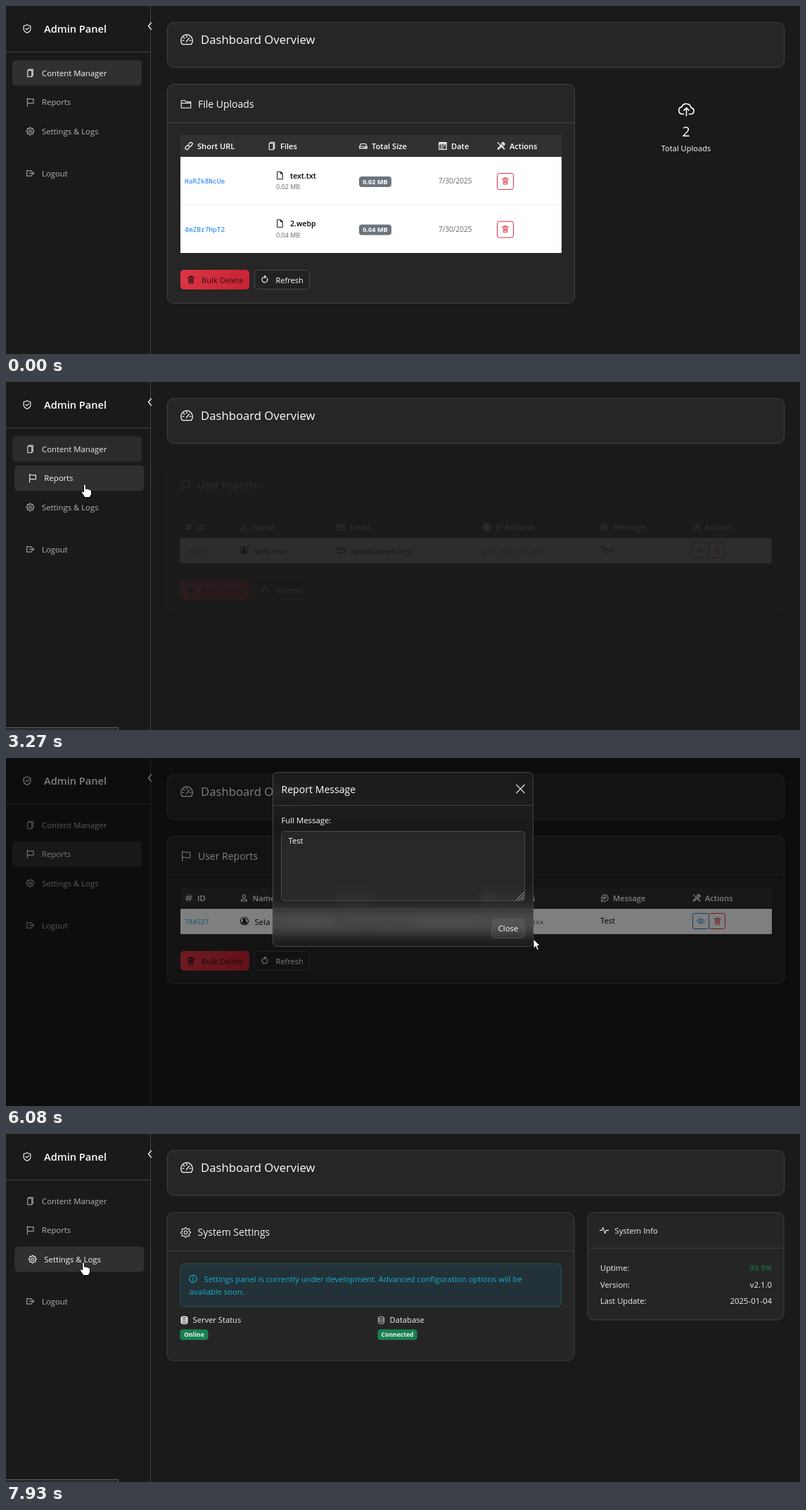
Recreate the animation shown at these times as an HTML page with a canvas. Size 1129 px wide and 496 px high, loop 8 s.

```html
<!DOCTYPE html>
<html lang="en">
<head>
<meta charset="utf-8">
<title>Admin Panel</title>
<style>
  html, body { margin: 0; width: 100%; height: 100%; overflow: hidden; background: #1a1a1a; }
  canvas { display: block; }
</style>
</head>
<body>
<canvas id="stage" width="1129" height="496"></canvas>
<script>
const W = 1129, H = 496, LOOP = 8000;
const SANS = '"Open Sans", "Noto Sans", sans-serif';
const MONO = '"Noto Sans Mono", "DejaVu Sans Mono", monospace';
const LINE = '#424242', WHITE = '#fff', RED = '#dc3545', GREEN = '#198754';

const stage = document.getElementById('stage');
const main = stage.getContext('2d');
const buffer = new OffscreenCanvas(W, H);
const layer = buffer.getContext('2d');
let g = main;

// ---------- timing ----------
const clamp = v => Math.max(0, Math.min(1, v));
const lin = (t, at, d) => clamp((t - at) / d);
const bez = (u, a, b) => 3 * u * (1 - u) ** 2 * a + 3 * u * u * (1 - u) * b + u ** 3;
function ease(x) {
  let lo = 0, hi = 1;
  for (let i = 0; i < 16; i++) {
    const mid = (lo + hi) / 2;
    if (bez(mid, .25, .25) < x) lo = mid; else hi = mid;
  }
  return x <= 0 ? 0 : x >= 1 ? 1 : bez(lo, .1, 1);
}
const ramp = (t, at, d = 300) => ease(lin(t, at, d));
const pulse = (t, on, off, d = 300) => ramp(t, on, d) - ramp(t, off, d);

const TO_REPORTS = 3225, TO_SETTINGS = 7570, OPEN = 4950, CLOSE = 6480;

// ---------- icons on a 16 unit grid ----------
const ring = (r, x = 8, y = 8) => `M${x - r} ${y}a${r} ${r} 0 1 0 ${2 * r} 0a${r} ${r} 0 1 0 ${-2 * r} 0z`;
const cog = 'M' + Array.from({ length: 64 }, (_, i) => {
  const a = i * Math.PI / 32, r = 6.3 + .9 * Math.max(-1, Math.min(1, 2 * Math.cos(8 * a)));
  return (8 + r * Math.cos(a)).toFixed(2) + ' ' + (8 + r * Math.sin(a)).toFixed(2);
}).join('L') + 'Z';
const ICONS = {
  shield: 'M8 1L14 3V8C14 12 11 14 8 15C5 14 2 12 2 8V3ZM5.5 7.5L7.5 9.5L11 6',
  files: 'M3 3h8v12h-8zM5 3V1h8v12h-2',
  flag: 'M2.5 .5v15M2.5 2c4-1.5 7 1.5 11.5 0v8c-4.5 1.5-7.5-1.5-11.5 0',
  gear: cog + ring(2.4),
  logout: 'M10 5V3H1.5v10H10V11M6 8h9M12 5l3 3l-3 3',
  dial: 'M2.6 13.5a7 7 0 1 1 10.8 0zM7.5 10.5l3.5-4.5M8 3.5v1.5M3 9h1.5M11.5 9h1.5M4.3 5.3l1 1',
  folder: 'M1 13.5v-11h5l2 2h7v9zM1 6.5h14',
  link: 'M7 9a3 3 0 0 0 4 0l3-3a2.8 2.8 0 0 0-4-4l-2 2M9 7a3 3 0 0 0-4 0l-3 3a2.8 2.8 0 0 0 4 4l2-2',
  disk: 'M1 9l2.5-5h9l2.5 5v3.5h-14zM1 9h14M11 10.8h2',
  date: 'M1 1.5h14v13h-14zM1 3h14M1 5h14M4 8h2M7 8h2M10.500 8h2M4 11.500h2M7 11.500h2',
  tools: 'M1.500 1.500l6 6M9 9l5 5M10 9l4.500 4.500M14.500 3l-2.500 2l-1-1l2-2.500a3 3 0 0 0-4 4l-7.500 7.500l1.500 1.500l7.500-7.500a3 3 0 0 0 4-4z',
  file: 'M3 1h6.500l3.500 3.500v10.500h-10zM9.500 1v3.500h3.500',
  trash: 'M2 3.500h12M6 3.500v-2h4v2M3.500 3.500l.8 11h7.400l.8-11M6 6v6M8 6v6M10 6v6',
  refresh: 'M12.500 5a5.500 5.500 0 1 1-4.500-2.500M7.500 .3l3 2.200l-3 2.200',
  cloud: 'M5.500 12.500H4a3.300 3.300 0 0 1-.3-6.500a4.500 4.500 0 0 1 8.600 .8a2.900 2.900 0 0 1 .2 5.700h-2M8 14V7M5.800 9l2.200-2.200l2.200 2.200',
  person: ring(2.8, 8, 4.5) + 'M2.500 14c0-5.500 11-5.500 11 0z',
  mail: 'M1 3h14v10h-14zM1 4.500l7 4.500l7-4.500',
  globe: ring(7) + 'M8 1v14M1 8h14M2 4.700h12M2 11.300h12M8 1c-4.500 3-4.500 11 0 14c4.500-3 4.500-11 0-14',
  chat: 'M2 14.500l1-3a6.500 6 0 1 1 3 2.300zM5 6h6M5 8h6M5 10h4',
  eye: 'M.8 8c4-6 10.400-6 14.400 0c-4 6-10.400 6-14.400 0z' + ring(2.3),
  hash: 'M6.500 2L4.500 14M11.500 2L9.500 14M2.500 6h11.500M2 10h11.500',
  info: ring(7) + 'M8 7v5M8 4v1.300',
  data: 'M2.500 3.500c0-3 11-3 11 0v9c0 3-11 3-11 0zM2.500 3.500c0 2.500 11 2.500 11 0M2.500 6.500c0 2.500 11 2.500 11 0M2.500 9.500c0 2.500 11 2.500 11 0',
  wave: 'M.5 8h3.500l2-5l3.500 10l2-5h4',
  cross: 'M1.500 1.500l13 13M14.500 1.500l-13 13',
  chevron: 'M11 1L5 8L11 15'
};
for (const k in ICONS) ICONS[k] = new Path2D(ICONS[k]);

function icon(name, x, y, size, color = WHITE, weight = 1.05) {
  const s = size / 16;
  g.save();
  g.translate(x - size / 2, y - size / 2);
  g.scale(s, s);
  g.strokeStyle = color;
  g.lineWidth = weight / s;
  g.lineJoin = g.lineCap = 'round';
  g.stroke(ICONS[name]);
  g.restore();
}

// ---------- drawing helpers ----------
function text(str, x, y, size = 11.3, color = WHITE, { weight = 400, align = 'left', font = SANS } = {}) {
  g.font = `${weight} ${size}px ${font}`;
  g.fillStyle = color;
  g.textAlign = align;
  g.fillText(str, x, y + size * .36);
}
const bold = (str, x, y, size, color) => text(str, x, y, size, color, { weight: 600 });
const mono = (str, x, y, color) => text(str, x, y, 9.55, color, { font: MONO, weight: 500 });

function rect(x, y, w, h, color) {
  g.fillStyle = color;
  g.fillRect(x, y, w, h);
}
function box(x, y, w, h, r, fill, border) {
  g.beginPath();
  if (border) g.roundRect(x + .5, y + .5, w - 1, h - 1, r);
  else g.roundRect(x, y, w, h, r);
  if (fill) { g.fillStyle = fill; g.fill(); }
  if (border) { g.strokeStyle = border; g.lineWidth = 1; g.stroke(); }
}
function card(x, y, w, h, head) {
  box(x, y, w, h, 9, '#262626', LINE);
  if (head) rect(x + 1, y + head, w - 2, 1, LINE);
}
function badge(str, x, y, w, h, color, size) {
  box(x, y, w, h, 4, color);
  text(str, x + w / 2, y + h / 2, size, WHITE, { weight: 700, align: 'center' });
}
function tableHead(w, cols) {
  rect(248, 184, w, 31, '#313131');
  for (const [name, label, x] of cols) {
    icon(name, x, 199.5, 12, WHITE, 1.1);
    bold(label, x + 12, 200, 11.1, WHITE);
  }
}
function buttons(y) {
  const fill = g.createLinearGradient(248, y, 346, y + 28);
  fill.addColorStop(0, '#dc3545');
  fill.addColorStop(1, '#c82333');
  box(248, y, 98, 28, 5, fill);
  icon('trash', 263, y + 14, 12, '#2b1416');
  text('Bulk Delete', 278, y + 15, 11.2, '#2b1416');
  box(353, y, 79, 28, 5, '#222', '#474747');
  icon('refresh', 368, y + 14, 11.5, WHITE, 1.1);
  text('Refresh', 383.5, y + 15, 11);
}
function cardTitle(name, label) {
  icon(name, 256, 140, 15.5);
  text(label, 273, 140, 14);
}

// ---------- pages ----------
function fileRow(y, code, name, size) {
  mono(code, 254, y, '#0b7bf5');
  icon('file', 389.5, y - 8.5, 12, '#111');
  bold(name, 404, y - 8, 10.5, '#000');
  text(size, 384, y + 8, 9, '#666');
  badge(size, 502, y - 7, 46, 15, '#6c757d', 9.2);
  text('7/30/2025', 615, y - .5, 10, '#666');
  box(698, y - 12, 24, 24, 3, WHITE, RED);
  icon('trash', 710, y - .5, 11.5, RED, .9);
}
function filesPage() {
  card(229, 111, 580, 313, 55);
  cardTitle('folder', 'File Uploads');
  tableHead(542, [['link', 'Short URL', 260], ['files', 'Files', 378], ['disk', 'Total Size', 508],
    ['date', 'Date', 621], ['tools', 'Actions', 704]]);
  rect(248, 215, 542, 137, WHITE);
  rect(248, 283, 542, 1, '#f1f1f1');
  fileRow(250, 'HaRZk8NcUe', 'text.txt', '0.02 MB');
  fileRow(318.5, '4mZBr7HpT2', '2.webp', '0.04 MB');
  buttons(376);
}
function filesStats() {
  icon('cloud', 967.5, 147, 25, WHITE, 1.6);
  text('2', 967, 179, 19.5, WHITE, { align: 'center' });
  text('Total Uploads', 967, 203, 11.1, WHITE, { align: 'center' });
}
function reportsPage(t) {
  const hot = pulse(t, 4640, 5000, 150);
  card(229, 111, 878, 211, 55);
  cardTitle('flag', 'User Reports');
  tableHead(841, [['hash', 'ID', 260], ['person', 'Name', 338.5], ['mail', 'Email', 476.5],
    ['globe', 'IP Address', 684.5], ['chat', 'Message', 851], ['tools', 'Actions', 982]]);
  rect(248, 215, 841, 36, WHITE);
  mono('784527', 254, 234, '#17b0da');
  icon('person', 339, 232.5, 7.5, '#000', 2);
  g.beginPath();
  g.arc(339, 232.5, 5.5, 0, 7);
  g.strokeStyle = '#000';
  g.lineWidth = 1.1;
  g.stroke();
  text('Sela mor', 353.5, 233.5, 11.5, '#000');
  icon('mail', 477, 232.5, 12, '#000');
  text('sela@mown.test', 491.5, 233.5, 11.4, '#000');
  mono('xxx.xxx.xxx.xxx', 678.5, 234, '#555');
  text('Test', 845, 231.5, 11.2, '#000');
  box(999, 221, 24, 23, 3, WHITE, RED);
  box(976, 221, 24, 23, 3, WHITE, '#2482c4');
  g.globalAlpha = hot;
  box(976, 221, 24, 23, 3, '#0d6efd', '#0d6efd');
  g.globalAlpha = 1;
  icon('eye', 988, 232.5, 11.5, hot > .5 ? WHITE : '#1e86c8', .95);
  icon('trash', 1011.5, 232.5, 11.5, '#d2493f', .9);
  buttons(275);
}
function settingsPage() {
  const cyan = '#15b7d8';
  card(229, 111, 580, 212, 55);
  cardTitle('gear', 'System Settings');
  box(248, 184, 542, 62, 5, '#23343a', '#265862');
  icon('info', 266.5, 206, 12, cyan);
  text('Settings panel is currently under development. Advanced configuration options will be', 282, 207, 11.3, cyan);
  text('available soon.', 261, 224.5, 11.3, cyan);
  icon('data', 254, 265, 12, WHITE, 1.6);
  text('Server Status', 266, 265, 11.2);
  badge('Online', 248, 278, 40, 15, GREEN, 8.6);
  icon('data', 534, 265, 12, '#ddd', .9);
  text('Database', 546, 265, 11.2);
  badge('Connected', 529, 278, 56, 15, GREEN, 8.6);
  card(827, 111, 280, 154, 51);
  icon('wave', 851, 137, 13);
  text('System Info', 866, 138, 11.2);
  [['Uptime:', '99.9%', GREEN], ['Version:', 'v2.1.0'], ['Last Update:', '2025-01-04']].forEach(([k, v, c], i) => {
    text(k, 845.5, 190.5 + i * 23.7, 11.2);
    text(v, 1089.5, 190.5 + i * 23.7, 11.4, c, { align: 'right' });
  });
}

function grouped(alpha, draw) {
  layer.clearRect(0, 0, W, H);
  g = layer;
  g.save();
  draw();
  g.restore();
  g = main;
  g.globalAlpha = alpha;
  g.drawImage(buffer, 0, 0);
  g.globalAlpha = 1;
}
function page(draw, shown, lift) {
  const dy = 8 * (1 - shown) - 1.6 * lift;
  grouped(shown, () => {
    g.translate(dy ? -.5 : 0, dy);
    draw();
  });
}

// ---------- shell ----------
function navItem(name, label, y, active, hover) {
  const on = Math.max(active, hover), dx = 3.3 * hover, v = 178 + 70 * on;
  const color = `rgb(${v},${v},${v})`;
  g.globalAlpha = on;
  box(9 + dx, y - 18, 184, 36, 5, '#303030');
  g.globalAlpha = 1;
  icon(name, 34.5 + dx, y, 12, color);
  text(label, 51 + dx, y, 11.35, color);
}
function shell(t) {
  rect(0, 0, W, H, '#1a1a1a');
  rect(205, 0, 1, H, LINE);
  rect(0, 65, 205, 1, LINE);
  icon('shield', 30, 32.5, 13, WHITE, 1.1);
  bold('Admin Panel', 54, 33, 14.6, WHITE);
  icon('chevron', 204.5, 28.5, 11, WHITE, 1.2);
  const toReports = ramp(t, TO_REPORTS), toSettings = ramp(t, TO_SETTINGS);
  navItem('files', 'Content Manager', 95.5, 1 - toReports, 0);
  navItem('flag', 'Reports', 137, toReports - toSettings, pulse(t, 2930, 3930));
  navItem('gear', 'Settings & Logs', 178.5, toSettings, ramp(t, 7400));
  navItem('logout', 'Logout', 238.5, 0, 0);
  card(229, 23, 878, 65);
  icon('dial', 257, 48, 19, WHITE, 1.3);
  text('Dashboard Overview', 277, 48, 16.7);
}

function modal(t) {
  const shown = lin(t, OPEN, 150) - lin(t, CLOSE, 150);
  if (shown <= 0) return;
  const out = x => 1 - (1 - x) ** 2;
  const dy = -40 * (1 - out(lin(t, OPEN, 300)) + out(lin(t, CLOSE, 300)));
  rect(0, 0, W, H, `rgba(0,0,0,${.5 * shown})`);
  grouped(shown, () => {
    g.save();
    g.beginPath();
    g.roundRect(379, 20 + dy, 371, 249, 6);
    g.clip();
    g.filter = 'blur(8px)';
    g.drawImage(stage, 0, 0);
    g.restore();
    g.translate(0, dy);
    box(379, 20, 371, 249, 6, 'rgba(36,36,36,.55)', '#474747');
    rect(380, 67, 369, 1, LINE);
    rect(380, 215, 369, 1, 'rgba(255,255,255,.08)');
    text('Report Message', 391.5, 44.5, 14.1);
    icon('cross', 731.5, 44, 14, '#ccc', 1.5);
    text('Full Message:', 391.5, 89, 11.35);
    box(391, 104, 347, 100, 5, 'rgba(255,255,255,.05)', '#4b4b4b');
    text('Test', 401.5, 118, 11.2);
    g.strokeStyle = '#aaa';
    g.lineWidth = 1;
    g.beginPath();
    for (const d of [4, 8, 12]) {
      g.moveTo(737 - d, 203);
      g.lineTo(737, 203 - d);
    }
    g.stroke();
    box(690, 228, 48, 29, 5, 'rgba(255,255,255,.06)', '#505050');
    text('Close', 714, 243, 11.3, WHITE, { align: 'center' });
  });
}

// ---------- pointer ----------
const PATH = [
  [500, 881, 478], [1270, 640, 372], [1330, 640, 372], [1840, 285, 259], [1990, 283, 257],
  [2190, 283, 257], [2960, 112, 146], [3870, 112, 146], [4630, 990, 236], [4830, 995, 231],
  [5000, 995, 231], [5470, 797, 264], [5540, 797, 264], [5800, 478, 112], [6080, 750, 258],
  [6290, 750, 258], [6440, 734, 249], [7170, 734, 249], [7480, 110, 183], [LOOP, 110, 183]
];
const ARROW = new Path2D('M0 0V13.500L3.100 10.600L5.300 15.800L7.600 14.800L5.400 9.800H9.600Z');
const HAND = new Path2D('M-1.500 1.500C-1.500-.5 1.500-.5 1.500 1.500V6.500C3 5.500 4.300 6 4.500 7C6 6.300 7 7 7.300 8C8.500 7.500 9.500 8.300 9.500 9.500V13C9.500 16 7.500 16 7.500 18.500H-.5C-.5 16.500-3 14.500-4.500 11.500C-5 9.800-3 9-1.500 11Z');
const BEAM = new Path2D('M-3-8H-1L0-7L1-8H3M0-7V7M-3 8H-1L0 7L1 8H3');

function pointer(t) {
  if (t < 500) return;
  const i = PATH.findIndex(p => p[0] > t);
  const [t0, x0, y0] = PATH[i - 1], [t1, x1, y1] = PATH[i];
  const k = lin(t, t0, t1 - t0), s = k * k * (3 - 2 * k);
  const x = x0 + (x1 - x0) * s, y = y0 + (y1 - y0) * s;
  const inField = t > OPEN && t < CLOSE && x > 391 && x < 738 && y > 104 && y < 204;
  g.save();
  g.translate(x, y);
  g.lineJoin = 'round';
  g.lineWidth = 1;
  if (inField) {
    g.strokeStyle = '#ddd';
    g.stroke(BEAM);
  } else {
    const shape = x < 193 ? HAND : ARROW;
    g.fillStyle = WHITE;
    g.strokeStyle = '#000';
    g.fill(shape);
    g.stroke(shape);
  }
  g.restore();
}

function linkHint(t) {
  if ((t < 3030 || t > 3930) && t < 7420) return;
  rect(0, 492, 160, 4, '#5c5c5c');
  rect(0, 493, 159, 3, '#2a2a2a');
}

function draw(t) {
  shell(t);
  if (t < TO_REPORTS) {
    page(filesPage, 1, pulse(t, 950, 2420));
    filesStats();
  } else if (t < TO_SETTINGS) {
    const lift = pulse(t, 4080, OPEN) + pulse(t, 7170, 7350);
    page(() => reportsPage(t), ramp(t, TO_REPORTS, 500), lift);
  } else {
    page(settingsPage, ramp(t, TO_SETTINGS, 500), 0);
  }
  modal(t);
  linkHint(t);
  pointer(t);
}

const start = performance.now();
function tick() {
  draw((performance.now() - start) % LOOP);
  requestAnimationFrame(tick);
}
tick();
</script>
</body>
</html>
```
